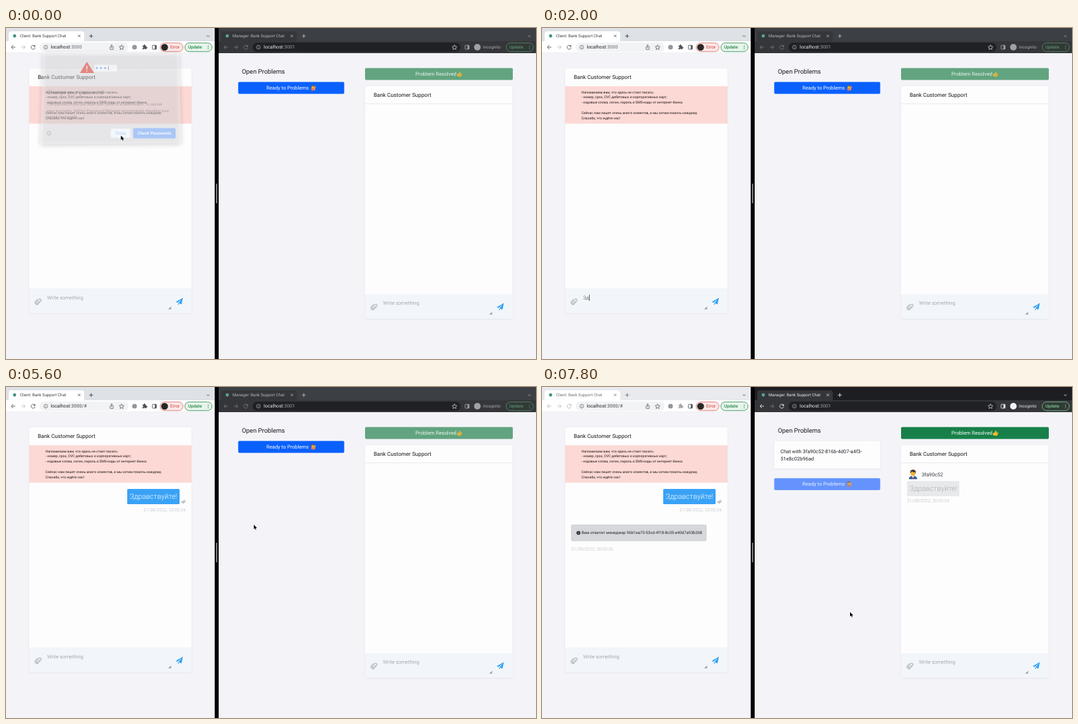
An HTML page with a canvas that plays this animation: 800 by 500 pixels, repeating every 8 s.

```html
<!DOCTYPE html>
<html lang="en">
<head>
<meta charset="utf-8">
<title>Support chat</title>
<style>
html, body { margin: 0; width: 100%; height: 100%; overflow: hidden; background: #f4f4f8; }
canvas { display: block; width: 800px; height: 500px; }
</style>
</head>
<body>
<canvas id="stage"></canvas>
<script>
const canvas = document.getElementById('stage');
const ctx = canvas.getContext('2d');
const ratio = window.devicePixelRatio || 1;
canvas.width = 800 * ratio;
canvas.height = 500 * ratio;

const LOOP = 8000, STEP = 200;
const SENT = 5000, FOCUS = 6000, ACCEPTED = 6600;
const WORD = 'Здравствуйте!';
const CLIENT_ID = '3fa90c52-816b-4d07-a4f3-';
const CLIENT_TAIL = '51e8c02b96ad';
const MANAGER_ID = '96b1ea70-53cd-4f18-8c05-e40d7a93b268';
const NOTICE = [
  'Напоминаем вам, что здесь не стоит писать:',
  '- номер, срок, CVC дебетовых и корпоративных карт;',
  '- кодовые слова, логин, пароль и SMS-коды от интернет-банка.',
  '',
  'Сейчас нам пишет очень много клиентов, и мы хотим помочь каждому.',
  'Спасибо, что ждёте нас!'
];

// Pointer keys: time, x, y, shape held until the next key
const POINTER = [
  [0, 173.5, 162.5, 'arrow'], [200, 173, 165, 'arrow'], [600, 133, 401.5, 'arrow'],
  [800, 129, 407, 'beam'], [1800, 129, 407, ''], [4400, 150, 407, 'beam'],
  [4600, 222, 411, 'arrow'], [4800, 258, 416, 'hand'], [5200, 258, 416, 'arrow'],
  [5800, 432, 104, 'arrow'], [6000, 441, 92, 'hand'], [6600, 441, 92, 'arrow'],
  [7000, 403, 131, 'arrow'], [7400, 403, 131, 'arrow'], [7800, 465, 340, 'arrow']
];

function box(x, y, w, h, r, fill, stroke, width = 0.7) {
  ctx.beginPath();
  ctx.roundRect(x, y, w, h, r);
  if (fill) { ctx.fillStyle = fill; ctx.fill(); }
  if (stroke) { ctx.strokeStyle = stroke; ctx.lineWidth = width; ctx.stroke(); }
}

function dot(x, y, r, fill, stroke, width = 0.8) {
  ctx.beginPath();
  ctx.arc(x, y, r, 0, 7);
  if (fill) { ctx.fillStyle = fill; ctx.fill(); }
  if (stroke) { ctx.strokeStyle = stroke; ctx.lineWidth = width; ctx.stroke(); }
}

// Draws an SVG path moved to x, y
function icon(d, x, y, { fill, stroke, width = 0.9, turn = 0 }) {
  ctx.save();
  ctx.translate(x, y);
  ctx.rotate(turn);
  const path = new Path2D(d);
  if (stroke) { ctx.strokeStyle = stroke; ctx.lineWidth = width; ctx.stroke(path); }
  if (fill) { ctx.fillStyle = fill; ctx.fill(path); }
  ctx.restore();
}

function text(s, x, y, size, color, weight = 400, align = 'left') {
  ctx.font = `${weight} ${size}px Roboto, sans-serif`;
  ctx.textAlign = align;
  ctx.textBaseline = 'middle';
  ctx.fillStyle = color;
  ctx.fillText(s, x, y);
  return ctx.measureText(s).width;
}

const STAR = 'M0-3.7L1.1-1.2 3.7-1 1.7.8 2.3 3.4 0 2-2.3 3.4-1.7.8-3.7-1-1.1-1.2Z';
const CLIP = 'M1.2-2.2V2.2a1.2 1.2 0 0 1-2.4 0V-3a2 2 0 0 1 4 0V2.5a2.9 2.9 0 0 1-5.8 0V-2';
const PLANE = 'M5.3-5.5L-5.5.8-2.8 2 3.3-3.4-1.3 2.6 3.2 4.5ZM-2.2 2.9V5.5L0 3.6Z';
const ARROW = 'M0 0V6.8L1.6 5.3 2.7 7.8 3.8 7.3 2.7 4.9H4.9Z';
const HAND = 'M-1.4-3.6a.7.7 0 0 1 1.4 0V-1.2L2.6-.7Q3.4-.4 3.3.5L2.7 3.6H-1.3L-3.3.8Q-3.4-.3-2.2.1L-1.4.8Z';
const PUZZLE = 'M-3-1.8H-1.1a1.2 1.2 0 1 1 2.2 0H2.6V.2a1.2 1.2 0 1 1 0 2V3.6H.7a1 1 0 1 0-2 0H-3V1.7a1 1 0 1 0 0-1.9Z';

function backArrow(x, color, flip) {
  icon('M3.1 0H-2.8M0-3L-3 0 0 3', x, 29, { stroke: color, turn: flip ? Math.PI : 0 });
}

function reload(x, color) {
  icon('M2.3-1.8A3 3 0 1 0 2.9.8', x, 29, { stroke: color });
  icon('M3.2-3.4V-.4H.2Z', x, 29, { fill: color });
}

function info(x, y, r, color) {
  dot(x, y, r, null, color, 0.7);
  icon('M0-.3V1.6M0-1.6V-.9', x, y, { stroke: color, width: 0.8 });
}

function sidebar(x, color) {
  box(x - 3, 26.2, 6, 5.8, 0.6, null, color, 0.9);
  box(x + 0.6, 26.2, 2.4, 5.8, 0, color);
}

function tab(x, title, fill, color, mark) {
  box(x, 5, 114, 16, [4, 4, 0, 0], fill);
  dot(x + 9, 12, 2.4, mark);
  text(title, x + 17, 12.3, 6.15, color);
  icon('M-1.8-1.8L1.8 1.8M1.8-1.8L-1.8 1.8', x + 106.5, 12, { stroke: color, width: 0.8 });
  icon('M-2.9 0H2.9M0-2.9V2.9', x + 124.5, 12.2, { stroke: color, width: 0.9 });
}

function updatePill(x, fill, color) {
  box(x, 22.6, 41, 13.1, 6.5, fill, color, 0.8);
  text('Update', x + 5, 29.3, 6.5, color, 500);
  for (let i = -1; i < 2; i++) dot(x + 35.2, 29.2 + i * 2.2, 0.65, color);
}

function chevron(x, color) {
  icon('M-2-1L0 1 2-1', x, 12.3, { stroke: color, width: 0.9 });
}

function clientBrowser(active, sent) {
  const soft = active ? '#55595e' : '#b9bcc0';
  box(0, 0, 315, 22, 0, active ? '#dee1e6' : '#e8eaed');
  tab(4, 'Client: Bank Support Chat', '#fff', active ? '#3c4043' : '#6d7175', '#3f8f83');
  chevron(305, '#4a4d51');
  box(0, 20, 315, 18, 0, '#fff');
  backArrow(11, soft);
  backArrow(26, '#bcbfc3', true);
  reload(41, soft);
  box(51, 22, 134, 14, 7, '#f1f3f4');
  info(60, 29, 2.9, '#5f6368');
  const w = text('localhost', 67.5, 29.3, 7.15, '#202124');
  text(sent ? ':3000/#' : ':3000', 67.5 + w, 29.3, 7.15, sent ? '#45494d' : '#65696e');
  icon('M-1-.8H-2.4V3.4H2.4V-.8H1M0 1.4V-3.6M-1.6-2.1L0-3.7 1.6-2.1', 159.5, 29, { stroke: '#5f6368', width: 0.8 });
  icon(STAR, 174.5, 29.2, { stroke: '#55595e', width: 0.8 });
  dot(194, 29, 3.6, '#93979b');
  icon(PUZZLE, 209, 28.6, { fill: active ? '#4d5156' : '#a4a7ab' });
  sidebar(224, '#4d5156');
  box(232.8, 22.6, 34.4, 13.1, 6.5, '#fce8e6', '#d9655e', 0.8);
  dot(239.4, 29.1, 5.2, '#2a2827');
  text('Error', 248, 29.3, 6.6, '#c93a32');
  updatePill(270, '#e6f4ea', '#26854a');
  box(0, 37.4, 315, 0.6, 0, '#dfe1e5');
}

function managerBrowser(active) {
  const main = active ? '#e8eaed' : '#76787b';
  const label = active ? '#e8eaed' : '#a7a9ad';
  box(321, 0, 479, 22, 0, active ? '#1d1e21' : '#3c3f43');
  tab(325, 'Manager: Bank Support Chat', '#35363a', active ? '#e8eaed' : '#b4b6b9', '#55a897');
  chevron(790, label);
  box(321, 20, 479, 18, 0, '#35363a');
  backArrow(332, main);
  backArrow(347, '#76787b', true);
  reload(362, main);
  box(372, 22, 314, 14, 7, '#202124');
  info(381, 29, 2.9, '#a9acb0');
  const w = text('localhost', 389, 29.3, 7.15, '#e8eaed');
  text(':3001', 389 + w, 29.3, 7.15, '#9aa0a6');
  icon(STAR, 677, 29.2, { stroke: '#c9ccd0', width: 0.8 });
  sidebar(696, active ? '#e8eaed' : '#a0a2a5');
  dot(711.5, 29, 5, active ? '#f1f3f4' : '#9fa1a4');
  text('Incognito', 720, 29.3, 6.4, label);
  updatePill(755, '#303a36', active ? '#81c995' : '#5f8c6e');
}

function card(x, y, w, h, foot) {
  ctx.save();
  ctx.shadowColor = 'rgba(40,50,80,.09)';
  ctx.shadowBlur = 3 * ratio;
  ctx.shadowOffsetY = 0.7 * ratio;
  box(x, y, w, h, 1.5, '#fdfdfe');
  ctx.restore();
  if (!foot) return;
  box(x, foot, w, y + h - foot, [0, 0, 1.5, 1.5], '#f2f6fa');
  box(x, foot - 0.3, w, 0.6, 0, '#e4e9ee');
}

function composer(x, y, right, value, caret) {
  icon(CLIP, x + 13.5, y + 19, { stroke: '#8f9498', width: 0.85, turn: 0.72 });
  icon(PLANE, right - 18.3, y + 19, { fill: '#33a0f5' });
  icon('M2.3-2.3V2H-2.3Z', right - 33, y + 29, { fill: '#a0a3a6' });
  const left = x + 27;
  if (value) {
    const w = text(value, left, y + 13.3, 7.6, '#3c4043', 300);
    if (caret) box(left + w + 0.4, y + 8.5, 0.7, 9.5, 0, '#222');
  } else {
    text('Write something', left, y + 13.3, 7.6, '#83878b', 300);
    if (caret) box(left - 0.4, y + 8.5, 0.7, 9.5, 0, '#222');
  }
}

function stamp(s, x, y, align) {
  text(s, x, y, 6.75, '#b2b4b8', 300, align);
}

function clientPage(t, value, caret) {
  card(35, 61, 245, 370, 394);
  text('Bank Customer Support', 48, 74.3, 8.2, '#15171a');
  box(35, 88, 245, 56.5, 0, '#fcd9d5');
  NOTICE.forEach((s, i) => text(s, 59.5, 97 + i * 7.8, 5.2, '#1f1415'));
  composer(35, 394, 280, value, caret);
  if (t >= SENT) {
    box(183, 154, 79, 23, 1.5, '#3aa2f6');
    text(WORD, 222.5, 166, 10.9, '#fff', 300, 'center');
    icon('M-3 .2L-1.5 1.8 2-2M-1.2 1.5L.2 3 3.3-.5', 267.6, 172.6, { stroke: '#565a5e', width: 0.8 });
    stamp('21/08/2022, 20:05:24', 271, 185.8, 'right');
  }
  if (t >= ACCEPTED) {
    box(44.3, 208.3, 203.6, 24, 1.5, '#d6d8dc', '#c3c6ca');
    dot(55, 220.4, 2.8, '#222');
    icon('M0-.4V1.7M0-1.8V-1', 55, 220.4, { stroke: '#fff', width: 0.8 });
    text('Вам ответит менеджер ' + MANAGER_ID, 59.8, 220.5, 6.1, '#222529');
    stamp('21/08/2022, 20:05:26', 44, 245.3);
  }
}

function raisedHand(x, y) {
  box(x - 3, y - 0.2, 6, 4.2, 1.5, '#e0785a');
  dot(x - 0.4, y - 1.6, 2.3, '#f4b431');
  icon('M-2.7-1.4Q-2.6-4.3 0-4.2 1.9-4 1.9-1.8L0-2.8Z', x, y, { fill: '#7d4a2c' });
  icon('M2.2 2.6L3.3-2.6', x, y, { stroke: '#f4b431', width: 1.4 });
}

function thumb(x, y) {
  icon('M-3.7-.3H-1.5L.2-3.8Q1.5-4 1.3-2.6L.9-.9H3.5Q4.4-.3 3.8.9L3 3.2Q2.7 3.9 1.7 3.9H-1.2L-3.7 3.2Z',
    x, y, { fill: '#fdbb31' });
  icon('M1.2.6H3.9M1 2.1H3.5', x, y, { stroke: '#d98b22', width: 0.45 });
}

function person(x, y) {
  icon('M-6.3 7.2Q-6.2 3 -2 2.4H2Q6.2 3 6.3 7.2Z', x, y, { fill: '#355f96' });
  icon('M-1.8 2.3L0 6.3 1.8 2.3Z', x, y, { fill: '#fff' });
  icon('M0 3L.8 6.9H-.8Z', x, y, { fill: '#c43a36' });
  dot(x, y - 1.6, 3.7, '#f5b536');
  icon('M-4.1-1.2Q-5-7 0-7.2 5-7 4.1-1.2L3-3.3Q0-3.1-2-4.5Z', x, y, { fill: '#453530' });
}

function readyButton(y, fill, dim) {
  box(350.5, y, 160, 18, 1.7, fill);
  text('Ready to Problems', 393, y + 9.2, 7.65, dim ? '#edf3ff' : '#fff');
  ctx.globalAlpha = dim ? 0.75 : 1;
  raisedHand(463.5, y + 9);
  ctx.globalAlpha = 1;
}

function managerPage(t) {
  const open = t >= ACCEPTED;
  text('Open Problems', 356, 66.3, 9.5, '#15171a');
  if (open) {
    card(350.5, 81.5, 160, 41.5);
    text('Chat with ' + CLIENT_ID.slice(0, 24), 360, 97.3, 7.55, '#212529');
    text(CLIENT_TAIL, 360, 108.5, 7.55, '#212529');
    readyButton(137.8, '#6493fd', true);
  } else {
    readyButton(81.5, t >= 5800 ? '#0b50d9' : '#0a60fd');
  }
  box(542, 60.5, 223, 18, 1.7, open ? '#178049' : '#62a47f');
  text('Problem Resolved', 618, 69.8, 7.7, open ? '#fff' : '#eef6f1');
  ctx.globalAlpha = open ? 1 : 0.75;
  thumb(684.5, 69.5);
  ctx.globalAlpha = 1;
  card(542, 88, 222.5, 351, 403);
  text('Bank Customer Support', 555, 101.3, 8.2, '#15171a');
  box(542, 114, 222.5, 0.7, 0, '#e6e7eb');
  composer(542, 402, 764.5, '', false);
  if (open) {
    person(560, 132);
    text(CLIENT_ID.slice(0, 8), 573, 132.3, 7.65, '#33373b');
    box(551, 142, 79, 23, 1.5, '#e8e9eb');
    text(WORD, 590.5, 154, 10.9, '#a9acb0', 300, 'center');
    stamp('21/08/2022, 20:05:24', 551, 171.8);
  }
}

// Closing password sheet, already mostly transparent
function sheet(strength) {
  if (!strength) return;
  ctx.save();
  ctx.globalAlpha = strength;
  ctx.shadowColor = 'rgba(30,30,40,.45)';
  ctx.shadowBlur = 7 * ratio;
  ctx.shadowOffsetY = 2 * ratio;
  icon('M56 37H261L264.5 171Q264.6 174 261 174L55 175.5Q51.5 175.5 51.6 172Z', 0, 0, { fill: 'rgba(255,255,255,.38)' });
  ctx.shadowColor = 'transparent';
  icon('M88 74Q82 57 101 54 108 40 133 46M168 40H199Q206 57 192 73H170', 0, 0, { stroke: '#e3e5e8', width: 0.8 });
  box(133, 55.5, 35, 10.5, 2, 'rgba(255,255,255,.6)', '#e3e7ec', 0.6);
  icon('M122 51L133 68H111.5Z', 0, 0, { fill: '#e2877f' });
  icon('M122 57V63M122 64.5V66', 0, 0, { stroke: '#fff', width: 1.2 });
  for (let i = 0; i < 3; i++) dot(137 + i * 6.3, 60.6, 1.5, '#9bbcf0');
  box(154, 58, 0.7, 5.5, 0, '#77818d');
  const faint = 'rgba(60,55,60,.32)';
  text('Change your password', 62, 97.5, 8.4, faint);
  text('The password you just used was found in a data breach. To secure', 62, 115.3, 5.9, faint);
  text('your accounts, Velmot Password Manager recommends checking your', 62, 125, 5.9, faint);
  text('saved passwords.', 62, 134.5, 5.9, faint);
  info(65, 159, 3, '#b2b4b8');
  box(158, 152, 30, 14, 2, '#f3f7fc', '#e6edf6', 0.6);
  text('Close', 173, 159.3, 6.5, '#a9cdf0', 400, 'center');
  box(192, 151.3, 64, 15.5, 2, '#aac6f6');
  text('Check Passwords', 224, 159.3, 6.4, '#fff', 500, 'center');
  ctx.restore();
}

function pointer(t) {
  let i = POINTER.length - 1;
  while (POINTER[i][0] > t) i--;
  const [t0, x0, y0, shape] = POINTER[i];
  const [t1, x1, y1] = POINTER[i + 1] || [LOOP, x0, y0];
  const k = (t - t0) / (t1 - t0);
  const x = x0 + (x1 - x0) * k, y = y0 + (y1 - y0) * k;
  if (shape === 'arrow') icon(ARROW, x, y, { fill: '#000', stroke: '#fff', width: 1.1 });
  if (shape === 'hand') icon(HAND, x, y, { fill: '#fff', stroke: '#222', width: 1.1 });
  if (shape === 'beam') icon('M-1.4-4Q0-4 0-3V3Q0 4-1.4 4M1.4-4Q0-4 0-3V3Q0 4 1.4 4', x, y, { stroke: '#222', width: 0.7 });
}

function typed(t) {
  if (t < 1800 || t >= SENT) return '';
  const n = t < 2000 ? 1 : Math.round(2 + (t - 2000) * 7 / 1600);
  return WORD.slice(0, n);
}

function draw(t) {
  ctx.setTransform(ratio, 0, 0, ratio, 0, 0);
  ctx.textRendering = 'geometricPrecision';
  ctx.lineJoin = 'round';
  box(0, 0, 800, 500, 0, '#f4f4f8');
  clientBrowser(t < FOCUS, t >= SENT);
  managerBrowser(t >= FOCUS);
  clientPage(t, typed(t), t >= 1000 && t < 4600);
  managerPage(t);
  box(315, 0, 6, 500, 0, '#000');
  box(317, 235, 2, 30, 1, '#7b7c7e');
  sheet(t < 200 ? 1 : t < 400 ? 0.25 : 0);
  pointer(t);
}

let last = -1;
function tick() {
  const t = Math.floor(performance.now() % LOOP / STEP) * STEP;
  if (t !== last) draw(last = t);
  requestAnimationFrame(tick);
}
tick();
</script>
</body>
</html>
```
